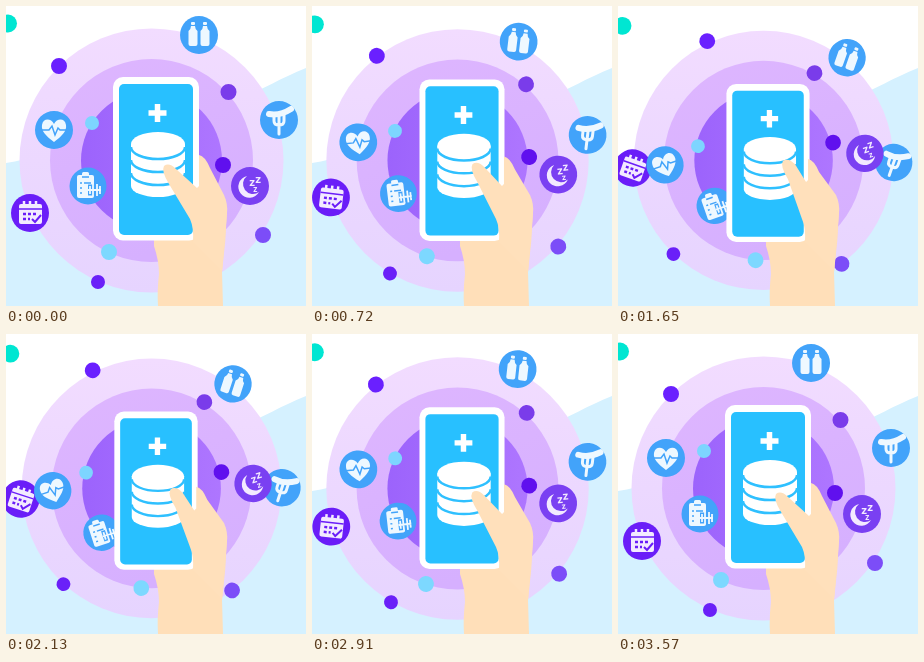
Animation, 300 px wide and 300 px high, one loop 3.6 s. Source, as an HTML page:

```html
<!DOCTYPE html>
<html lang="en">
<head>
<meta charset="utf-8">
<title>Health data</title>
<style>
  html, body { margin: 0; height: 100%; overflow: hidden; background: #fff; }
  svg { display: block; width: 100vw; height: 100vh; }
  text { font: bold 11px Inter, Arial, sans-serif; }
</style>
</head>
<body>
<svg viewBox="0 0 300 300">
  <defs>
    <linearGradient id="outer" x2="0" y2="1"><stop stop-color="#f2dcff"/><stop offset="1" stop-color="#e6d4ff"/></linearGradient>
    <linearGradient id="middle" x2="0.4" y2="1"><stop stop-color="#deb6ff"/><stop offset="1" stop-color="#d6b0ff"/></linearGradient>
    <linearGradient id="inner"><stop stop-color="#9c63fc"/><stop offset="1" stop-color="#ae76ff"/></linearGradient>
  </defs>

  <path fill="#d5f1ff" d="M0 157C25 153 40 147 70 130L230 115V94C258 83 275 72 300 62V300H0Z"/>
  <g id="scene">
    <circle cx="145.500" cy="154.500" r="132" fill="url(#outer)"/>
    <circle cx="145.500" cy="154.500" r="101.500" fill="url(#middle)"/>
    <circle cx="145.500" cy="154.500" r="70.500" fill="url(#inner)"/>
    <circle cx="2" cy="17.500" r="9" fill="#00e6d2"/>

    <g id="clockwise">
      <circle cx="53" cy="60" r="8" fill="#6a20ff"/>
      <circle cx="92" cy="276" r="7" fill="#6a20f8"/>
      <circle cx="257" cy="229" r="8" fill="#7c4df8"/>
      <g transform="translate(24 207)">
        <circle r="19" fill="#6a1df8"/>
        <rect x="-11" y="-9" width="23" height="20" rx="2" fill="#f3eaff"/>
        <path d="M-6-12v6M0-12v6M6-12v6" stroke="#f3eaff" stroke-width="2.500"/>
        <path d="M-11-4H12" stroke="#6a1df8" stroke-width="1.500"/>
        <path d="M-7 1H8M-7 6H0" stroke="#6a1df8" stroke-width="2.500" stroke-dasharray="3 2"/>
        <path d="M2 6l3 3 6-7" fill="none" stroke="#6a1df8" stroke-width="2"/>
      </g>
      <g transform="translate(193 29)">
        <circle r="19" fill="#42a3fa"/>
        <g id="bottle" fill="#eef8ff">
          <rect x="-8" y="-13" width="4" height="3" rx="1"/>
          <path d="M-8-9h4q0 3 2.500 5v13q0 2-2 2h-5q-2 0-2-2V-4q2.500-2 2.500-5Z"/>
        </g>
        <use href="#bottle" x="12"/>
      </g>
      <g transform="translate(273 114)">
        <circle r="19" fill="#42a3fa"/>
        <path d="M-10-6Q1-4 12-11" fill="none" stroke="#eef8ff" stroke-width="6" stroke-linecap="round"/>
        <path d="M-5-5v6q0 4 5 4t5-4v-7M0-5V14" fill="none" stroke="#eef8ff" stroke-width="3" stroke-linecap="round"/>
      </g>
    </g>

    <g id="counter">
      <circle cx="86" cy="117" r="7" fill="#7dd5ff"/>
      <circle cx="103" cy="246" r="8" fill="#7dd8ff"/>
      <circle cx="222.500" cy="86" r="8" fill="#7a3cea"/>
      <circle cx="217" cy="159" r="8" fill="#6010ee"/>
      <g transform="translate(48 124)">
        <circle r="19" fill="#42a3fa"/>
        <path d="M0 12C-8 6-13 1-12-5C-11-12-3-12 0-6C3-12 11-12 12-5C13 1 8 6 0 12Z" fill="#eef8ff"/>
        <path d="M-13 0h8l3-4 3 9 3-7 2 2h7" fill="none" stroke="#42a3fa" stroke-width="1.500"/>
      </g>
      <g transform="translate(82 180)">
        <circle r="18.500" fill="#42a3fa"/>
        <rect x="-11" y="-11" width="17" height="23" rx="2" fill="#eef8ff"/>
        <rect x="-6" y="-14" width="7" height="5" rx="1.500" fill="#eef8ff"/>
        <path d="M-6-9h7M-8-3h2M-8 2h2M-8 7h2M-4-3h7" stroke="#42a3fa" stroke-width="1.500"/>
        <path d="M0 4H14" stroke="#42a3fa" stroke-width="11"/>
        <path d="M0 4h13M2 0v8M5-2v12M9-2v12M12 0v8" stroke="#eef8ff" stroke-width="1.800"/>
      </g>
      <g transform="translate(244 180)">
        <circle r="19" fill="#7a40f2"/>
        <path d="M-3-10A11 11 0 1 0 9 6A10 10 0 0 1-3-10Z" fill="#f3eaff"/>
        <g fill="#f3eaff"><text x="-1" y="0">z</text><text x="5" y="-3">z</text><text x="3" y="6" style="font-size:8px">z</text></g>
      </g>
    </g>
  </g>

  <path fill="#ffdfb9" d="M148 225V240Q153 255 153 268Q151 285 152 300H217L216 266Q220 235 221 205L190 175Z"/>
  <g id="phone">
    <rect x="107" y="71" width="86" height="163.500" rx="10" fill="#fff"/>
    <rect x="113" y="78" width="74" height="151" rx="5" fill="#28c0ff"/>
    <path d="M151.500 98v18M142.500 107h18" stroke="#fff" stroke-width="5.500"/>
    <path d="M125 138V180A27 11 0 0 0 179 180V138Z" fill="#fff"/>
    <ellipse cx="152" cy="138" rx="27" ry="12" fill="#fff"/>
    <path d="M125 141A27 12 0 0 0 179 141M125 154A27 12 0 0 0 179 154M125 167A27 12 0 0 0 179 167" fill="none" stroke="#2fc0ff" stroke-width="2.500"/>
  </g>
  <path id="fingers" fill="#ffe0bb"/>
</svg>
<script>
const $ = id => document.getElementById(id);
const LOOP = 3600, SWING = 19.6;

const scaleAbout = (x, y, s) => `translate(${x} ${y}) scale(${s}) translate(${-x} ${-y})`;
const move = (id, transform) => $(id).setAttribute('transform', transform);

// The thumb and fingertips slide while the palm stays in place.
function grip(p) {
  const tx = 157 + 7 * p, ty = 159 - 5 * p;
  const fx = 193 - 3 * p, fy = 149 + 4 * p;
  return `M${fx} ${fy}Q${fx + 6} ${fy + 1} ${fx + 11} ${fy + 13}L218 189Q222 198 221 207` +
    `L216 266L187 236Q188 222 184 213L${tx + 6} ${ty + 19}Q${tx - 2} ${ty + 6} ${tx + 1} ${ty + 1}` +
    `Q${tx + 6} ${ty - 3} ${tx + 13} ${ty + 4}L${fx - 2} ${182 - 6 * p}L${fx} ${180 - 6 * p}Z`;
}

function draw() {
  const phase = performance.now() % LOOP / LOOP;
  const p = (1 - Math.cos(phase * 2 * Math.PI)) / 2;
  move('scene', scaleAbout(150, 150, 1 - 0.018 * p));
  move('clockwise', `rotate(${SWING * p} 150 150)`);
  move('counter', `rotate(${-SWING * p} 150 150)`);
  move('phone', scaleAbout(150, 278, 1 - 0.034 * p));
  $('fingers').setAttribute('d', grip(p));
  requestAnimationFrame(draw);
}
draw();
</script>
</body>
</html>
```
